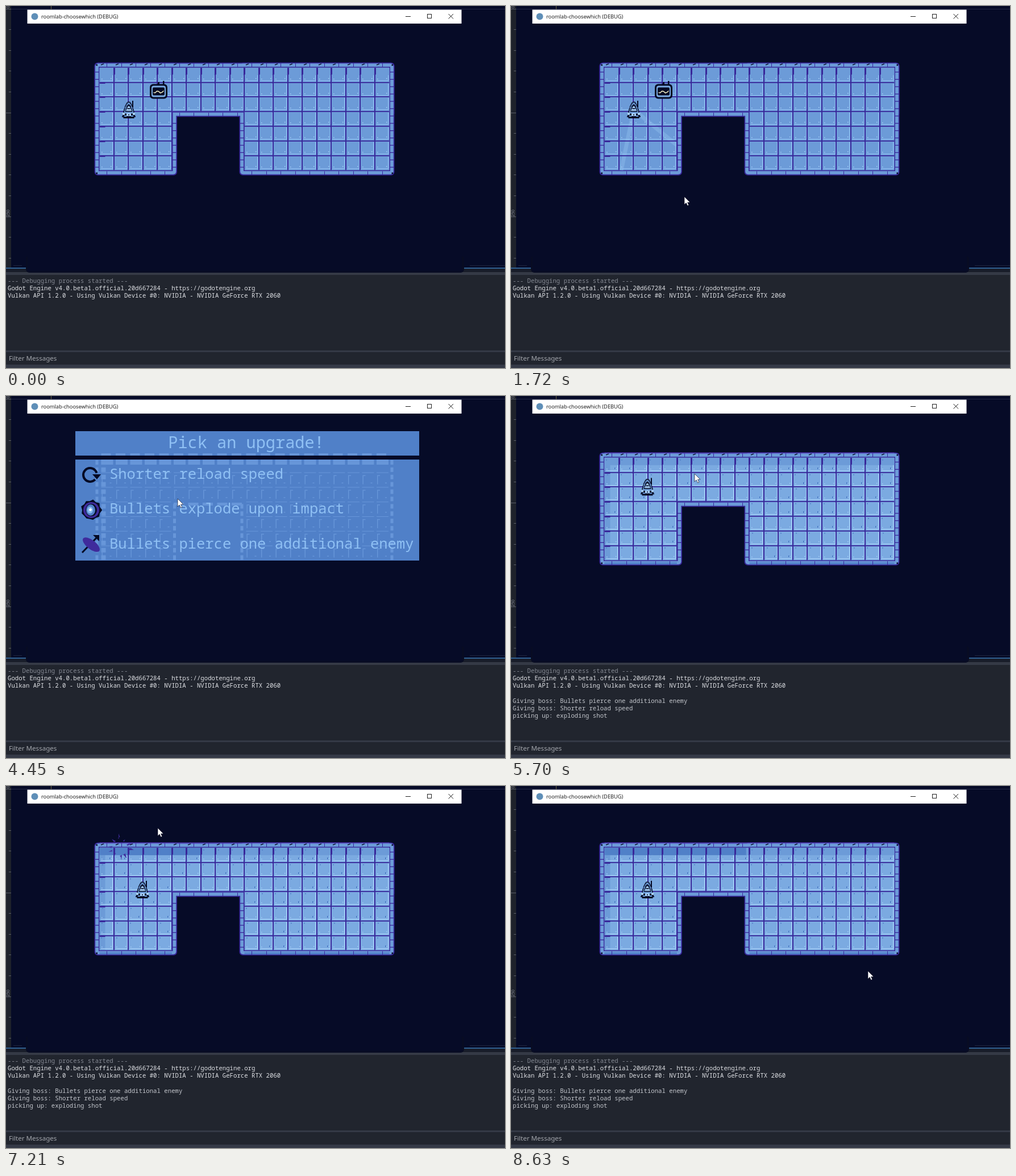
These frames come from a looping animation (878x638 px, 8660 ms). An HTML page with a canvas:

```html
<!DOCTYPE html>
<html lang="en">
<head>
<meta charset="utf-8">
<title>Room shooter</title>
<style>
html, body { margin: 0; width: 100%; height: 100%; overflow: hidden; background: #060b27; }
canvas { display: block; }
</style>
</head>
<body>
<canvas id="stage" width="878" height="638"></canvas>
<script>
const ctx = document.getElementById('stage').getContext('2d');
const LOOP = 8660, MENU_IN = 3460, MENU_OUT = 5380;
const NIGHT = '#060b27', INK = '#050a24', LINE = '#38279a', PURPLE = '#3f2b9c';
const MID = '#6c9bd8', LIGHT = '#7baae1', DEEP = '#5080c8', PALE = '#a6cff8', GLOW = '#86b8ef';
const TILE_X = 25.5, TILE_Y = 25.8, LEFT = 164.5, TOP = 108.8, COLS = 20, ROWS = 7, PIXEL = 1.59;
const RIGHT = LEFT + COLS * TILE_X, BOTTOM = TOP + ROWS * TILE_Y;
const MONO = '"Noto Sans Mono", monospace';

// The room is a U turned over, joined from three blocks of tiles.
const BLOCKS = [[0, 0, 20, 3], [0, 0, 5, 7], [10, 0, 10, 7]].map(([col, row, w, h]) =>
  ({ x: LEFT + col * TILE_X, y: TOP + row * TILE_Y, w: w * TILE_X, h: h * TILE_Y }));
const isFloor = (x, y) => BLOCKS.some(b => x > b.x && x < b.x + b.w && y > b.y && y < b.y + b.h);

// Where the pointer goes; it fires at the marked stops.
const FIRE = true;
const STOPS = [
  [120, 840, 345], [860, 181, 353, FIRE], [1260, 366, 306, FIRE], [1720, 305, 336], [1900, 312, 331],
  [4150, 312, 331], [4450, 302, 181], [4720, 304, 116], [5220, 306, 182], [5400, 306, 182], [5700, 323, 137],
  [6000, 328, 63, FIRE], [6390, 252, 63, FIRE], [6800, 176, 63, FIRE], [7210, 267, 74],
  [7650, 420, 77, FIRE], [8270, 628, 326]];
const HOLD = 90;

const clamp = v => Math.max(0, Math.min(1, v));
const ramp = (t, from, to) => clamp((t - from) / (to - from));
const ease = k => k * k * (3 - 2 * k);
const random = n => { const v = Math.sin(n * 127.1) * 43758.5453; return v - Math.floor(v); };

function pointerAt(t) {
  let [, x, y] = STOPS[0];
  for (let i = 1; i < STOPS.length; i++) {
    const [start, , , fired] = STOPS[i - 1], [end, nextX, nextY] = STOPS[i];
    const k = ease(ramp(t, start + (fired ? HOLD : 0), end));
    x += (nextX - x) * k;
    y += (nextY - y) * k;
  }
  return [x, y];
}

const playerAt = t => [
  216 + 15 * ramp(t, 2970, 3090) + 9 * ramp(t, 5380, 5450),
  183 - 28 * ramp(t, 2660, 2840) + 28 * ramp(t, 5670, 5830)];

// A bullet flies straight at the pointer until it meets a wall.
const SHOTS = STOPS.filter(stop => stop[3]).map(([at, aimX, aimY]) => {
  let [x, y] = playerAt(at);
  const reach = Math.hypot(aimX - x, aimY - y), dx = (aimX - x) / reach, dy = (aimY - y) / reach;
  while (isFloor(x, y)) { x += dx; y += dy; }
  return { at, x, y, blast: at > MENU_OUT };
});

function box(color, x, y, w, h) {
  ctx.fillStyle = color;
  ctx.fillRect(x, y, w, h);
}

function rounded(color, x, y, w, h, r) {
  ctx.beginPath();
  ctx.roundRect(x, y, w, h, r);
  ctx.fillStyle = color;
  ctx.fill();
}

function shape(color, points) {
  ctx.beginPath();
  points.forEach(([x, y]) => ctx.lineTo(x, y));
  ctx.closePath();
  ctx.fillStyle = color;
  ctx.fill();
}

function stroke(color, width, ...points) {
  ctx.beginPath();
  points.forEach(([x, y]) => ctx.lineTo(x, y));
  ctx.strokeStyle = color;
  ctx.lineWidth = width;
  ctx.stroke();
}

function disc(color, x, y, rx, ry = rx, turn = 0) {
  ctx.beginPath();
  ctx.ellipse(x, y, rx, ry, turn, 0, 7);
  ctx.fillStyle = color;
  ctx.fill();
}

function text(value, x, y, font, color, align = 'left') {
  ctx.font = font;
  ctx.fillStyle = color;
  ctx.textAlign = align;
  ctx.fillText(value, x, y);
}

function sideLabel(value, y) {
  ctx.save();
  ctx.translate(6, y);
  ctx.rotate(-Math.PI / 2);
  text(value, 0, 0, '7px "Noto Sans", sans-serif', '#8a8d98', 'center');
  ctx.restore();
}

function drawEditor(t) {
  box(NIGHT, 0, 0, 878, 638);
  box('#252a48', 9, 5, 869, 1);
  box('#686540', 79, 0, 1, 6);
  box('#1e222b', 0, 0, 9, 470);
  for (let i = 0; i < 13; i++) {
    const major = i % 5 === 0;
    box('#5a5e69', major ? 0 : 5, Math.round(4.5 + i * 36.6), major ? 9 : 4, 1);
  }
  sideLabel('250', 365);
  sideLabel('0', 2);
  box('#20253e', 13, 457, 15, 1);
  box('#20253e', 816, 457, 62, 1);
  box('#2f5f91', 0, 461, 878, 2);
  box('#191d29', 0, 463, 878, 7);
  box('#353a46', 0, 469, 878, 5);
  box('#21252e', 0, 474, 878, 164);
  rounded('#080c23', 35, 440, 771, 30, 6);
  box(NIGHT, 38, 31, 764, 436);
  box('#343946', 0, 607, 878, 3);
  box('#343946', 0, 632, 878, 6);
  text('Filter Messages', 5, 625, '11.6px "Noto Sans", sans-serif', '#a4a7ad');

  const log = (line, value, color) => text(value, 3, 488 + line * 13.2, '10.68px ' + MONO, color);
  log(0, '--- Debugging process started ---', '#858993');
  log(1, 'Godot Engine v4.0.beta1.official.20d667284 - https://godotengine.org', '#dfe1e5');
  log(2, 'Vulkan API 1.2.0 - Using Vulkan Device #0: NVIDIA - NVIDIA GeForce RTX 2060', '#dfe1e5');
  if (t < MENU_OUT) return;
  log(4, 'Giving boss: Bullets pierce one additional enemy', '#c3c6cc');
  log(5, 'Giving boss: Shorter reload speed', '#c3c6cc');
  log(6, 'picking up: exploding shot', '#c3c6cc');
}

function drawTitleBar() {
  box('#fff', 37.5, 6.5, 764, 24.5);
  disc('#5f8fb8', 50.5, 18.5, 6);
  text('roomlab-choosewhich (DEBUG)', 62, 22, '9.3px "Open Sans", sans-serif', '#111');
  stroke('#222', 1, [703, 18.5], [712, 18.5]);
  ctx.strokeRect(741.5, 14.5, 7, 7);
  stroke('#222', 1, [778.5, 14], [787, 22.5]);
  stroke('#222', 1, [787, 14], [778.5, 22.5]);
}

function fillBlocks(color, grow, radius = 0) {
  for (const b of BLOCKS) rounded(color, b.x - grow, b.y - grow, b.w + 2 * grow, b.h + 2 * grow, radius);
}

function drawWalls(fresh) {
  fillBlocks(LINE, 9, 6);
  fillBlocks(MID, 7.3, 5);
  if (fresh) {
    box('#6548cf', LEFT, TOP - 9, RIGHT - LEFT, 1);
    for (const b of BLOCKS.slice(1)) box(DEEP, b.x, BOTTOM + 4, b.w, 3);
  }
  for (let i = 0; i < COLS; i++) {
    const x = Math.round(LEFT + (i + 0.5) * TILE_X), inNotch = i > 4 && i < 10;
    box(LINE, x, TOP - 8, 1, 7);
    stroke(INK, 1.3, [x - 10, TOP - 5], [x - 5, TOP - 7]);
    box(LINE, x, inNotch ? TOP + 3 * TILE_Y + 2 : BOTTOM + 2, 1, 6);
  }
  for (let i = 0; i < ROWS * 2; i++) {
    const y = TOP + 7 + i * TILE_Y / 2;
    for (const b of BLOCKS.slice(1)) {
      if (b.x === LEFT || i > 6) box(LINE, b.x - 8, y, 7, 1.3);
      if (b.x !== LEFT || i > 6) box(LINE, b.x + b.w + 1, y, 7, 1.3);
    }
  }
  for (const x of [LEFT - 6, RIGHT + 4]) for (const y of [TOP - 6, BOTTOM + 4]) box(INK, x, y, 2.5, 2.5);
}

function clipFloor() {
  ctx.beginPath();
  for (const b of BLOCKS) ctx.rect(b.x, b.y, b.w, b.h);
  ctx.clip();
}

function drawTile(col, row, fresh) {
  const x = Math.floor(LEFT + col * TILE_X), y = Math.round(TOP - 1 + row * TILE_Y);
  const edge = fresh ? PALE : '#8ebcf0';
  box(edge, x + 3, y + 23, 21, 1.3);
  box(edge, x + 23, y + (row ? 3 : 14), 1.3, row ? 21 : 10);
  box(PALE, x + 4, y + 20, 1.5, 1.5);
  box(PALE, x + 20, y + 19, 1.5, 1.5);
  if (!fresh) return;
  const seed = row * COLS + col;
  box(DEEP, x + 3 + seed % 3, y + 4, 2, 1.5);
  if (random(seed + 5) > 0.5) box(DEEP, x + 18, y + 18, 2, 3);
}

function drawRoom(t) {
  const fresh = t >= MENU_OUT;
  drawWalls(fresh);
  fillBlocks(LINE, 1.5);
  fillBlocks(fresh ? LIGHT : MID, 0);
  ctx.save();
  clipFloor();
  if (fresh) {
    box(MID, LEFT, TOP, RIGHT - LEFT, 13);
    box(MID, LEFT, TOP, 10, BOTTOM - TOP);
  }
  for (const shot of SHOTS) {
    if (t < shot.at || shot.blast !== fresh) continue;
    if (fresh) box(DEEP, shot.x - 45, TOP, 92, 13);
    else stroke(LIGHT, 7, playerAt(shot.at), [shot.x, shot.y]);
  }
  for (let row = 0; row < ROWS; row++) for (let col = 0; col < COLS; col++) drawTile(col, row, fresh);
  for (let i = 1; i < COLS; i++) {
    const x = Math.floor(LEFT - 0.8 + i * TILE_X);
    box(LINE, x, TOP, 2, BOTTOM - TOP);
    box(LINE, x, TOP, 3, 12);
  }
  for (let i = 1; i < ROWS; i++) {
    const y = Math.round(TOP - 1 + i * TILE_Y);
    box(LINE, LEFT, y, RIGHT - LEFT, 1.8);
    box(LINE, LEFT, y, 10, 3);
  }
  ctx.restore();
}

// A stepped dome in sprite pixels around a centre.
function dome(color, x, y, top, bottom, half) {
  for (let row = top; row < bottom; row++) {
    const w = Math.round(half * 2 * Math.sqrt((row - top + 0.6) / (bottom - top))) * PIXEL;
    box(color, x - w / 2, y + row * PIXEL, w, PIXEL + 0.2);
  }
}

function drawPlayer(x, y) {
  box(INK, x + 6, y - 16, 2, 12);
  dome(INK, x, y, -9, 8, 7.5);
  box(INK, x - 9.5, y + 12, 19, 3);
  dome(MID, x, y, -8, 4, 5.5);
  dome(INK, x, y, -6, 2, 4);
  dome(PALE, x, y, -4, 1, 3);
  box(INK, x - 2.5, y - 3, 5, 1.6);
  box(PALE, x - 4, y + 6, 8, 5);
  box(INK, x - 1, y + 8, 2, 1.6);
  for (const side of [-1, 1]) {
    box(PALE, x + side * 9 - 2, y + 5, 4, 4);
    box(MID, x + side * 6 - 2, y + 10, 4, 2);
  }
}

function drawMonitor() {
  box(INK, 267, 134, 3, 6);
  box(INK, 276, 132, 2.5, 8);
  rounded(INK, 253, 137.5, 31, 26, 6);
  rounded(LIGHT, 256, 140.5, 25, 20, 4);
  rounded(INK, 258, 143.5, 21, 14, 2);
  const wave = Array.from({ length: 7 }, (_, i) => [259.5 + i * 3, 151.5 + 2 * Math.sin(i * 1.7 + 0.6)]);
  stroke('#f4f1c6', 1.5, ...wave);
}

function burst(color, x, y, inner, outer, count, seed) {
  const points = [];
  for (let i = 0; i < count * 2; i++) {
    const a = i * Math.PI / count;
    const r = i % 2 ? inner : inner + (outer - inner) * (0.3 + 0.9 * random(i + seed));
    points.push([x + Math.cos(a) * r, y + Math.sin(a) * r]);
  }
  shape(color, points);
}

function drawFlash(x, y, grow) {
  const haze = ctx.createRadialGradient(x, y, 18, x, y, 37);
  haze.addColorStop(0, 'rgba(5,8,36,.9)');
  haze.addColorStop(1, 'rgba(5,8,36,0)');
  disc(haze, x, y, 37);
  burst(PURPLE, x, y, 22 * grow, 31 * grow, 24, 8);
  burst('#fff', x, y, 20 * grow, 28 * grow, 24, 3);
  disc(PURPLE, x, y, 14.5 * grow, 16.5 * grow);
  disc(GLOW, x, y, 13 * grow, 15 * grow);
  disc('#fff', x, y, 12 * grow, 14 * grow);
}

function drawShards(x, y, k) {
  for (let i = 0; i < 10; i++) {
    const a = i * 0.63 + random(i + x) * 0.4;
    const r = 8 + 7 * k + random(i + 4) * 6;
    const at = d => [x + Math.cos(a) * d, y + Math.sin(a) * d];
    const [near, far] = [at(r), at(r + 11 * (1.3 - k))], w = 2.6 * (1.3 - k);
    shape(PURPLE, [[near[0] - w, near[1]], [near[0], near[1] + w], far, [near[0] + w, near[1] - w]]);
  }
}

function drawBlast({ x, y }, age) {
  if (age < 0 || age > 580) return;
  const k = ramp(age, 170, 580);
  if (k === 0) {
    drawFlash(x, y, 0.8 + 0.2 * ramp(age, 0, 40));
  } else if (k < 0.35) {
    burst(PURPLE, x, y, 17, 28, 18, 5);
    burst(k < 0.15 ? GLOW : DEEP, x, y, 12 - k * 20, 21 - k * 25, 15, 9);
  } else {
    drawShards(x, y, k);
  }
}

function drawBeam(shot, age, [px, py]) {
  if (age < 0 || age > 160) return;
  const length = Math.hypot(shot.x - px, shot.y - py);
  const ux = (shot.x - px) / length, uy = (shot.y - py) / length, w = 4 * (1 - age / 200);
  const side = (d, offset) => [px + ux * d - uy * offset, py + uy * d + ux * offset];
  shape('#fff', [side(15, w), side(length, w / 2), side(length, -w / 2), side(15, -w)]);
}

function drawGhostRoom() {
  const ghost = '#6796d9';
  for (let i = 0; i < COLS; i++) {
    const x = LEFT + i * TILE_X, inNotch = i > 4 && i < 10;
    box(ghost, x + 3, 101, 17, 4);
    box(ghost, x + 3, 112, 21, 9);
    if (inNotch) box(ghost, x + 3, 188, 18, 5);
    for (let j = 1; j < (inNotch ? 3 : ROWS); j++) {
      const y = TOP - 1 + j * TILE_Y;
      box(ghost, x + 3, y + 1, 21, 1);
      box(ghost, x + 4, y + 7, 1.4, 15);
      box(ghost, x + 4, y + 6, 5, 1.4);
      box(ghost, x + 18, y + 19, 3, 1.4);
    }
  }
  for (let i = 0; i < ROWS * 2; i++) {
    const y = 113 + i * TILE_Y / 2, h = Math.min(8, 290 - y);
    box(ghost, LEFT + 3, y, 8, h);
    for (const b of BLOCKS.slice(1)) {
      if (b.x === LEFT || i > 5) box(ghost, b.x - 7, y, 5, h);
      if (b.x !== LEFT || i > 5) box(ghost, b.x + b.w + 2, y, 5, h);
    }
  }
}

function drawIcons() {
  ctx.beginPath();
  ctx.arc(148, 139, 12, 0.75, 6);
  ctx.strokeStyle = INK;
  ctx.lineWidth = 4;
  ctx.stroke();
  shape(INK, [[152, 138], [167, 138], [160, 147]]);

  burst(INK, 150, 201, 16, 19, 9, 4);
  disc(PURPLE, 150, 201, 14);
  disc(INK, 150, 201, 10, 11);
  disc(DEEP, 149, 201, 8, 10);
  disc(GLOW, 148, 201, 5, 6);
  box('#fff', 146, 199.5, 5, 2);
  box('#fff', 147.5, 198, 2, 5);

  stroke(INK, 3, [134, 276], [162, 247]);
  shape(INK, [[153, 245], [164, 245], [164, 256]]);
  disc(PURPLE, 150, 262, 18, 8, 0.67);
}

function drawMenu(t) {
  ctx.globalAlpha = ramp(t, MENU_IN, MENU_IN + 90);
  box(NIGHT, 38, 31, 764, 430);
  box(DEEP, 122, 62, 605, 43);
  box(DEEP, 122, 112, 605, 178);
  drawGhostRoom();
  const color = '#8fc0f4';
  text('Pick an upgrade!', 422.5, 92, '300 28.6px ' + MONO, color, 'center');
  ['Shorter reload speed', 'Bullets explode upon impact', 'Bullets pierce one additional enemy']
    .forEach((label, i) => text(label, 182, 146 + i * 61.3, '300 25.5px ' + MONO, color));
  drawIcons();
  ctx.globalAlpha = 1;
}

function drawPointer(t) {
  if (t < STOPS[0][0]) return;
  const [x, y] = pointerAt(t);
  if (SHOTS.some(({ at }) => t >= at && t < at + HOLD)) disc('rgba(255,240,0,.53)', x, y, 10);
  const outline = [[0, 0], [0, 14], [3.2, 11], [5.5, 16], [7.8, 15], [5.6, 10.2], [10, 10]];
  shape('#fff', outline.map(([dx, dy]) => [x + dx, y + dy]));
  ctx.strokeStyle = 'rgba(5,8,30,.8)';
  ctx.lineWidth = 0.8;
  ctx.stroke();
}

function drawGame(t) {
  const player = playerAt(t);
  drawRoom(t);
  if (t < MENU_OUT) drawMonitor();
  for (const shot of SHOTS) {
    drawBeam(shot, t - shot.at, player);
    if (shot.blast) drawBlast(shot, t - shot.at);
  }
  drawPlayer(...player);
}

function draw(t) {
  drawEditor(t);
  drawTitleBar();
  drawGame(t);
  if (t >= MENU_IN && t < MENU_OUT) drawMenu(t);
  drawPointer(t);
}

const start = performance.now();
function tick() {
  draw((performance.now() - start) % LOOP);
  requestAnimationFrame(tick);
}
tick();
</script>
</body>
</html>
```
